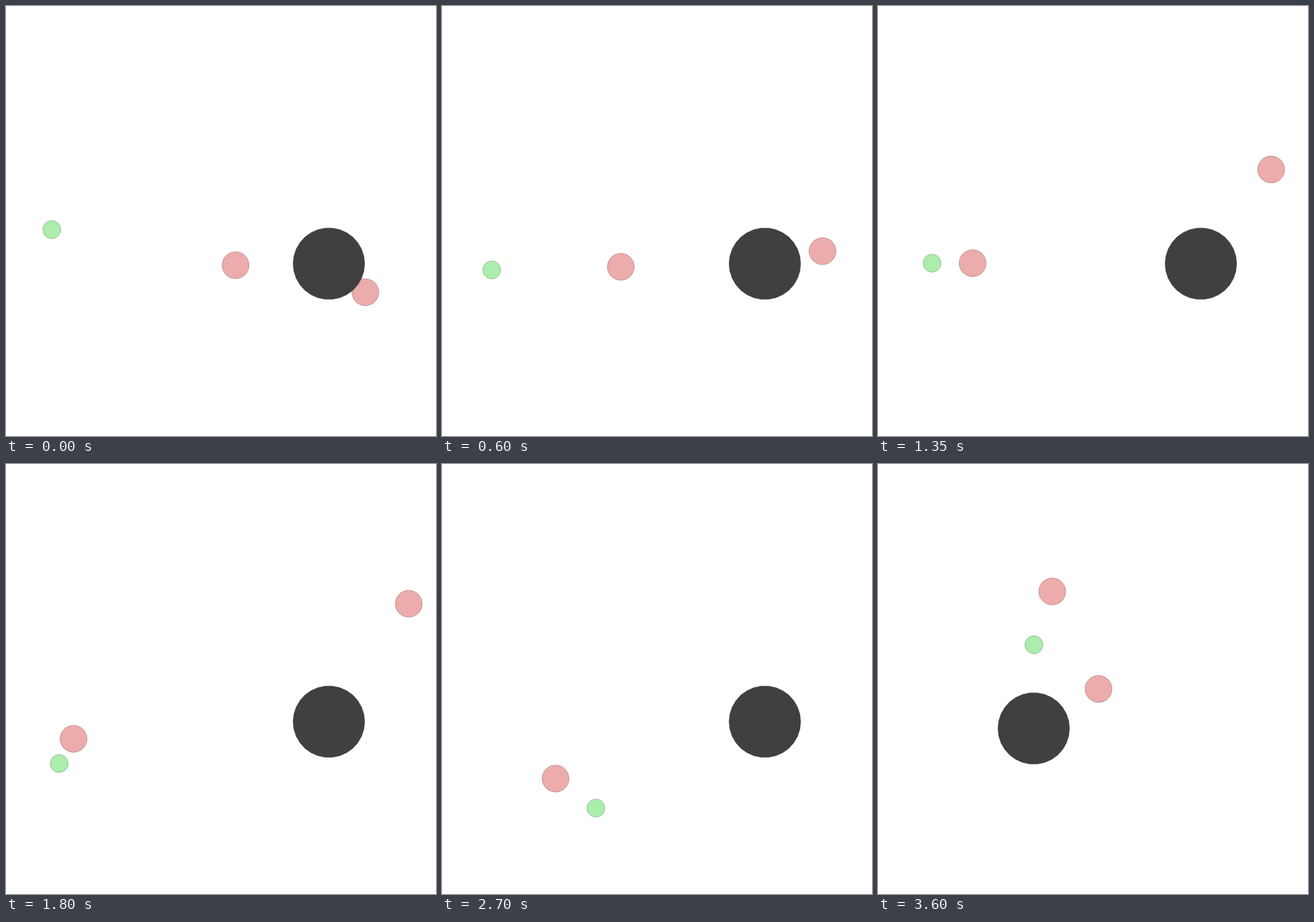
Recreate the animation shown at these times as an HTML page with a canvas. Size 700 by 700 pixels, loop 3750 ms.

```html
<!DOCTYPE html>
<html lang="en">
<head>
<meta charset="utf-8">
<title>Pursuit</title>
<style>
  html, body { margin: 0; width: 100%; height: 100%; overflow: hidden; background: #fff; }
  canvas { display: block; width: 700px; height: 700px; }
</style>
</head>
<body>
<canvas id="stage" width="700" height="700"></canvas>
<script>
const ctx = document.getElementById('stage').getContext('2d');
const STEP = 150, STEPS = 25, DRAG = 0.75;

const HUNTER = { r: 21.9, top: 29.3, fill: '#ecacac', line: 'rgba(108,45,45,0.4)' };
const PREY = { r: 14.6, top: 38, fill: '#acecac', line: 'rgba(45,108,45,0.4)' };
const ROCK = { r: 58.4, top: 0, fill: '#404040', line: 'rgba(32,32,32,0.3)' };

// Each push is [steps, ax, ay]; respawn is the place in the next world
const bodies = [
  {
    kind: HUNTER, start: [373.7, 422], speed: [-11.4, 0.65], respawn: [283.6, 207.5],
    pushes: [[8, -7.6, 0.16], [1, -6.4, -9], [3, 0.8, 8.6], [2, 4.65, 4.15], [9, 8.95, -0.22]]
  },
  {
    kind: HUNTER, start: [585, 466], speed: [1.5, -6.4], respawn: [359, 366.2],
    pushes: [[3, 4.6, -6.9], [1, 0.1, -6.9], [4, 0.1, -9.2], [3, 0.6, -0.1],
             [2, 8.6, -0.1], [10, 3, -0.1]]
  },
  {
    kind: PREY, start: [74.5, 364], speed: [1, 13.5], respawn: [253.8, 294.3],
    pushes: [[2, 0.25, 9.4], [2, 1.16, -3.45], [4, 0.15, -4.05], [4, -0.43, 11.8],
             [6, 11.8, 0], [2, 9.5, -0.6], [1, 8, -3.5], [2, 0.6, -10.6]]
  },
  { kind: ROCK, start: [525.6, 419.5], speed: [0, 0], respawn: [253.5, 430.5], pushes: [] }
];

// Drag, push and a top speed give the place after a number of steps
function place({ kind, start, speed, pushes, respawn }, steps) {
  if (steps === STEPS - 1) return respawn;
  let [x, y] = start, [vx, vy] = speed;
  for (const [count, ax, ay] of pushes) {
    for (let i = 0; i < count && steps > 0; i++, steps--) {
      vx = vx * DRAG + ax;
      vy = vy * DRAG + ay;
      const limit = Math.min(1, kind.top / Math.hypot(vx, vy));
      vx *= limit;
      vy *= limit;
      x += vx;
      y += vy;
    }
  }
  return [x, y];
}

function disc(kind, [x, y]) {
  const sides = 30;
  ctx.beginPath();
  for (let i = 0; i < sides; i++) {
    const angle = i * 2 * Math.PI / sides;
    ctx.lineTo(x + kind.r * Math.cos(angle), y + kind.r * Math.sin(angle));
  }
  ctx.closePath();
  ctx.fillStyle = kind.fill;
  ctx.fill();
  ctx.strokeStyle = kind.line;
  ctx.stroke();
}

function draw(now) {
  const step = Math.floor(now / STEP) % STEPS;
  ctx.fillStyle = '#fff';
  ctx.fillRect(0, 0, 700, 700);
  bodies.forEach(body => disc(body.kind, place(body, step)));
}

let begin;
function tick(now) {
  begin ??= now;
  draw(now - begin);
  requestAnimationFrame(tick);
}
draw(0);
requestAnimationFrame(tick);
</script>
</body>
</html>
```
